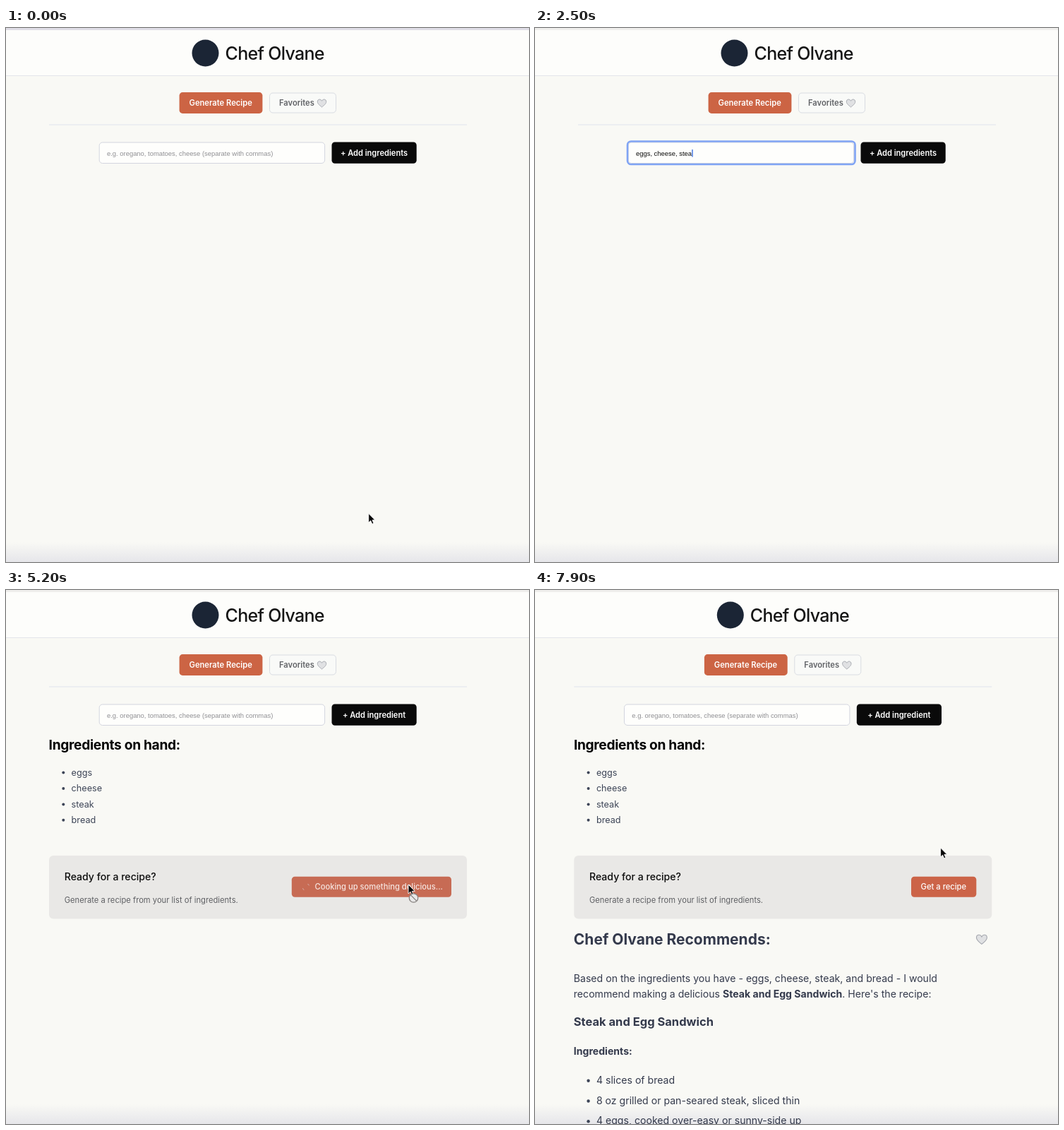
Write an HTML page that moves like this. It is 741 by 756 pixels and loops after 8 s.

```html
<!DOCTYPE html>
<html lang="en">
<head>
<meta charset="utf-8">
<title>Recipe helper</title>
<style>
  html, body { margin: 0; width: 100%; height: 100%; overflow: hidden; background: #f9f9f5; }
  svg { display: block; width: 741px; height: 756px; }
  text { font: 11.2px Inter, sans-serif; white-space: pre; }
  .mid { text-anchor: middle; }
  .medium { font-weight: 500; }
  .semi { font-weight: 600; }
  .bold { font-weight: 700; }
  .title { font-size: 25px; font-weight: 500; letter-spacing: -.7px; }
  .heading { font-size: 19.2px; font-weight: 700; letter-spacing: -.33px; }
  .item { font-size: 12.65px; fill: #3d4557; }
  .field { font-family: "Liberation Sans", Arial, sans-serif; font-size: 9.42px; }
  .body { font-size: 14.1px; fill: #343a4c; }
  .recommend { font-size: 21px; }
  .dish { font-size: 16.5px; }
</style>
</head>
<body>
<svg viewBox="0 0 741 756">
  <defs>
    <linearGradient id="fade" x2="0" y2="1">
      <stop stop-color="#e6e6ea" stop-opacity="0"/>
      <stop offset="1" stop-color="#e6e6ea"/>
    </linearGradient>
    <path id="heart" d="M0 5.5C-3 3-6.2.8-6.2-2.2C-6.2-6-1.6-6.6 0-3.2C1.6-6.6 6.2-6 6.2-2.2C6.2.8 3 3 0 5.5Z"
      fill="#e0e1e3" stroke="#a2a5ac" stroke-width=".9"/>
  </defs>

  <rect width="741" height="756" fill="#f9f9f5"/>
  <rect y="2" width="741" height="65" fill="#fdfdfb"/>
  <rect y="67" width="741" height="1" fill="#e4e5eb"/>
  <rect id="topEdge" width="741" height="3"/>
  <rect y="728" width="741" height="28" fill="url(#fade)"/>

  <g id="page">
    <circle cx="282.5" cy="35.5" r="19" fill="#1b2535"/>
    <text x="310.5" y="44.7" class="title" fill="#161616">Chef Olvane</text>

    <rect x="245.6" y="91.1" width="117.8" height="29.8" rx="4.5" fill="#cc6444"/>
    <text x="304.2" y="110.2" class="mid semi" fill="#fff">Generate Recipe</text>
    <rect x="373.5" y="92" width="94" height="28" rx="4.5" fill="#f9faf8" stroke="#d9dce2"/>
    <text x="387" y="110.2" class="semi" fill="#616367">Favorites</text>
    <use href="#heart" x="447.5" y="106.5"/>
    <rect x="61" y="136.5" width="592" height="1" fill="#dfe3ee"/>

    <rect x="132.2" y="162" width="319.4" height="29.5" rx="4.5" fill="#fefefc" stroke="#d3d5df"/>
    <rect id="ring" x="131" y="160.5" width="322.5" height="32.5" rx="5" fill="none" stroke="#80a4f4" stroke-width="2.6"/>
    <text id="entry" x="143" y="180.5" class="field"></text>
    <rect id="caret" y="172" width="1.4" height="10.5" fill="#3a6fe0"/>

    <rect x="461.5" y="161.5" width="120.2" height="30.3" rx="4.5" fill="#0a0a0a"/>
    <text id="addLabel" x="521.5" y="180.7" class="mid semi" style="font-size:11.1px" fill="#fff"></text>

    <g id="pantry">
      <text x="60.6" y="226" class="heading" fill="#050505">Ingredients on hand:</text>
      <g id="items"></g>
      <rect x="61" y="376" width="592" height="89.5" rx="6" fill="#e9e8e6"/>
      <text x="82.7" y="411.3" class="medium" style="font-size:14.1px" fill="#0c0c0c">Ready for a recipe?</text>
      <text x="82.7" y="442.8" fill="#5f6064">Generate a recipe from your list of ingredients.</text>
      <rect id="action" y="405.8" height="29" rx="4.5"/>
      <text id="actionLabel" y="424.4" class="medium"></text>
      <circle id="spinner" cx="425" cy="420.5" r="5" fill="none" stroke="#e3e7ea" stroke-dasharray="3.2 12.508"/>
    </g>

    <g id="recipe">
      <text x="60.5" y="501.7" class="body bold recommend">Chef Olvane Recommends:</text>
      <use href="#heart" transform="translate(638.6 494.8) scale(1.2)"/>
      <text x="60.5" y="554.5" class="body">Based on the ingredients you have - eggs, cheese, steak, and bread - I would</text>
      <text x="60.5" y="577" class="body">recommend making a delicious <tspan class="bold">Steak and Egg Sandwich</tspan>. Here's the recipe:</text>
      <text x="60.5" y="616.6" class="body bold dish">Steak and Egg Sandwich</text>
      <text x="60.5" y="657.6" class="body bold">Ingredients:</text>
      <g id="recipeItems"></g>
    </g>
  </g>

  <g id="cursor">
    <path d="M0 0V13L3 10.2L5.1 15L7.3 14L5.3 9.4H9.3Z" fill="#080808" stroke="#fff" stroke-width=".9"/>
    <g id="blocked" fill="#e8e8e8" stroke="#85807e" stroke-width="1.3">
      <circle cx="7.5" cy="19" r="6.2"/>
      <path d="M3.2 14.6L11.8 23.4"/>
    </g>
  </g>
</svg>
<script>
const LOOP = 8000, STEP = 100;
const FOCUS = 800, TYPE_START = 1150, KEY_MS = 75, CURSOR_BACK = 3200;
const BLUR = 3900, ADDED = 4200, COOK = 5000, LEAVE = 5700, DONE = 7300;
const SCROLLBAR_SHIFT = -5.7;
const ENTRY = "eggs, cheese, steak, bread";
const HINT = "e.g. oregano, tomatoes, cheese (separate with commas)";

// Pointer moves: start, end, destination
const HOME = [513.7, 687.3];
const MOVES = [
  [100, 750, 254, 178],
  [3250, 3800, 544, 176],
  [4300, 4850, 570, 417],
  [5600, 6200, 679.7, 318.7],
  [7000, 7700, 574.6, 365]
];

const $ = id => document.getElementById(id);
const show = (id, on) => $(id).setAttribute("visibility", on ? "inherit" : "hidden");
const set = (id, attrs) => {
  for (const key in attrs) $(id).setAttribute(key, attrs[key]);
};

function fillList(id, lines, top, pitch, cls, radius) {
  $(id).innerHTML = lines.map((line, i) => {
    const y = top + i * pitch;
    return `<circle cx="81.3" cy="${y - 4.2}" r="${radius}" fill="#3d4557"/>` +
      `<text x="92.6" y="${y}" class="${cls}">${line}</text>`;
  }).join("");
}
fillList("items", ENTRY.split(", "), 262.8, 22.4, "item", 2);
fillList("recipeItems", [
  "4 slices of bread",
  "8 oz grilled or pan-seared steak, sliced thin",
  "4 eggs, cooked over-easy or sunny-side up"
], 699, 28.7, "body", 2.2);

function pointer(t) {
  let [x, y] = HOME;
  for (const [start, end, toX, toY] of MOVES) {
    const p = Math.min(1, Math.max(0, (t - start) / (end - start)));
    const k = p * p * (3 - 2 * p);
    x += (toX - x) * k;
    y += (toY - y) * k;
  }
  return [x, y];
}

function drawField(t) {
  const focused = t >= FOCUS && t < BLUR;
  const count = t < ADDED ? Math.max(0, Math.floor((t - TYPE_START) / KEY_MS)) : 0;
  const typed = ENTRY.slice(0, count);
  const typing = count > 0 && count < ENTRY.length;
  $("entry").textContent = typed || HINT;
  set("entry", { fill: typed ? "#0c0c0c" : "#8f8f93" });
  show("ring", focused);
  show("caret", focused && (typing || (t - FOCUS) % 1000 < 500));
  set("caret", { x: 143.3 + (typed ? $("entry").getComputedTextLength() : 0) });
  $("addLabel").textContent = t < ADDED ? "+ Add ingredients" : "+ Add ingredient";
}

function drawAction(t) {
  const cooking = t >= COOK && t < DONE;
  const hovered = t < LEAVE;
  set("action", {
    x: cooking ? 404.8 : 538.7,
    width: cooking ? 226.2 : 92.3,
    fill: cooking ? (hovered ? "#c76b54" : "#8d98a3") : "#cc6448"
  });
  $("actionLabel").textContent = cooking ? "Cooking up something delicious..." : "Get a recipe";
  set("actionLabel", {
    x: cooking ? 437.5 : 552.3,
    fill: cooking ? (hovered ? "#f6e4df" : "#f4f5f6") : "#fff"
  });
  show("spinner", t >= ADDED && cooking);
  set("spinner", {
    transform: `rotate(${(t - 6400) * 0.36 + 10} 425 420.5)`,
    opacity: hovered ? 0.45 : 0.9
  });
}

function draw(t) {
  set("topEdge", { fill: t < 100 ? "#dfdde6" : "#efeeec" });
  set("page", { transform: `translate(${t < DONE ? 0 : SCROLLBAR_SHIFT} 0)` });
  drawField(t);
  drawAction(t);
  show("pantry", t >= ADDED);
  show("recipe", t >= DONE);

  const [x, y] = pointer(t);
  set("cursor", { transform: `translate(${x} ${y})` });
  show("cursor", t < TYPE_START + KEY_MS || t >= CURSOR_BACK);
  show("blocked", t >= COOK && t < LEAVE);
}

const begin = performance.now();
function tick() {
  const t = (performance.now() - begin) % LOOP;
  draw(Math.floor(t / STEP) * STEP);
  requestAnimationFrame(tick);
}
tick();
</script>
</body>
</html>
```
